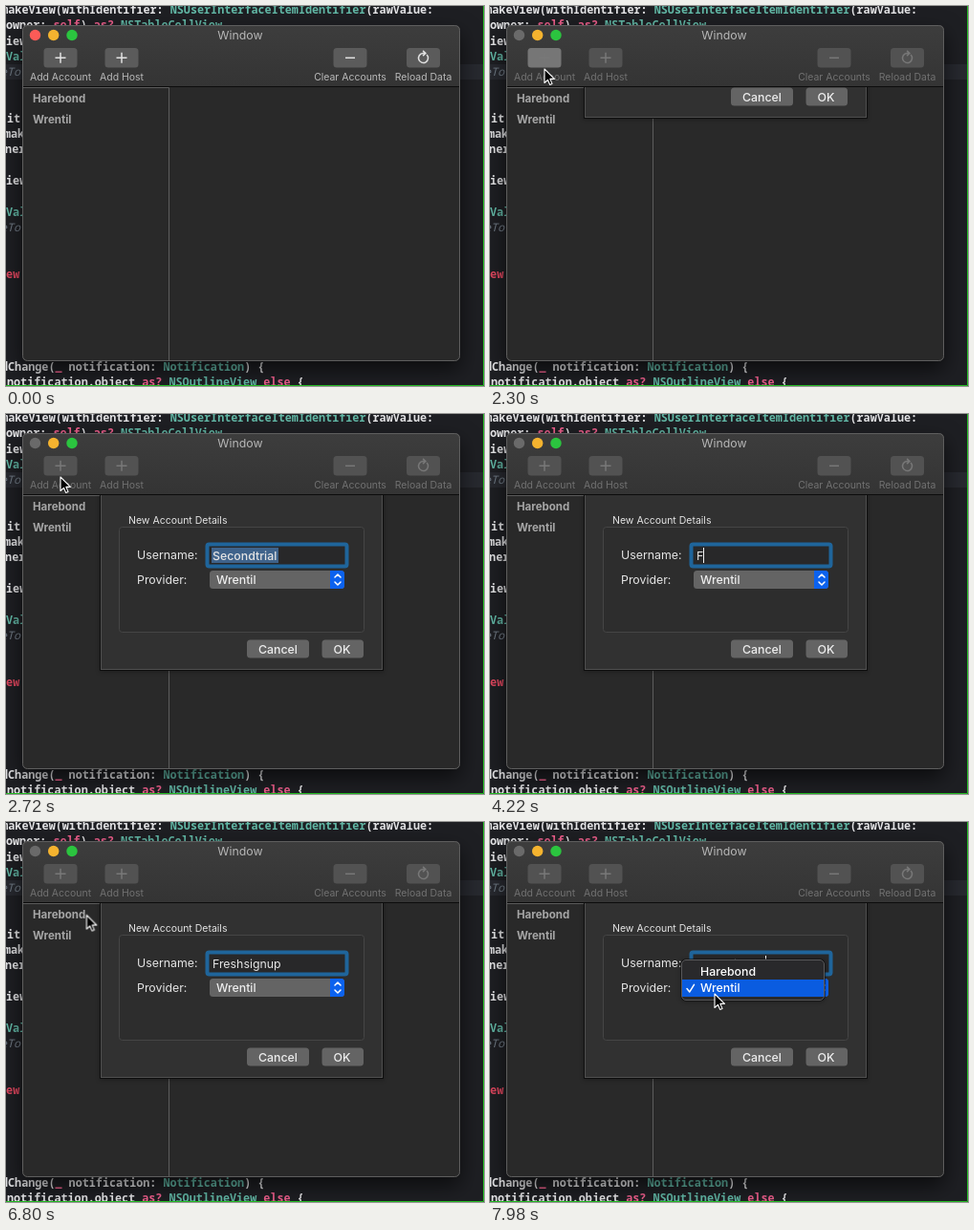
An HTML page that plays this animation: 500 px wide and 398 px high, repeating every 8000 ms.

```html
<!DOCTYPE html>
<html lang="en">
<head>
<meta charset="utf-8">
<title>Add account sheet</title>
<style>
html, body { margin: 0; width: 100%; height: 100%; overflow: hidden; background: #1c1d21; }
svg { display: block; width: 500px; height: 398px; }
text { font-family: Inter, "Open Sans", sans-serif; font-size: 12.35px; white-space: pre; }
.mid { text-anchor: middle; }

.code text { font: 600 11.78px "Noto Sans Mono", "DejaVu Sans Mono", monospace; fill: #e4e4e6; }
.code .type { fill: #62b8a6; }
.code .key { fill: #ee5f8c; }
.code .note { fill: #6f7984; font-style: italic; font-weight: 400; }
.code .err { fill: #e0475f; }
.shadow { filter: drop-shadow(0 9px 11px rgba(0, 0, 0, .6)); }
.soft { filter: drop-shadow(0 1px 2px rgba(0, 0, 0, .3)); }

.tool rect { fill: #5b5b5b; }
.tool path { fill: none; stroke: #e2e2e2; stroke-width: 1.5; }
.tool text { font-size: 10.46px; fill: #b9b9b9; text-anchor: middle; }
.side text { font-size: 11.5px; font-weight: 700; fill: #a6a6a6; }

.sheet text { fill: #e4e4e4; }
.sheet .title { font-size: 10.5px; }
.sheet .btn { fill: #646464; }
.sheet .face { font-weight: 500; fill: #ededed; }
.chev { fill: none; stroke: #fff; stroke-width: 1.5; stroke-linecap: round; stroke-linejoin: round; }
.menu text { fill: #fff; font-weight: 500; }

.sheet, .tool rect, .tool path, .tool text, .close, .cap, .ring, .pick, .menu, .mouse, .arrow {
  animation: 8s step-end infinite;
}
.close { animation-name: close; }
.tool rect { animation-name: dimBox; }
.tool rect:first-child { animation-name: pressBox; }
.tool path { animation-name: dimIcon; }
.tool text { animation-name: dimLabel; }
.sheet { animation-name: slide; }
.cap { animation-name: cap; }
.ring { animation-name: ring; animation-timing-function: linear; }
.pick { animation-name: pick; }
.menu { animation-name: menu; }
.mouse { animation-name: move; animation-timing-function: linear; }
.arrow { animation-name: arrow; }

@keyframes close { 0% { fill: #fc5b57; } 27.25%, 100% { fill: #6a6a6a; } }
@keyframes dimBox { 0% { fill: #5b5b5b; } 27.25%, 100% { fill: #525252; } }
@keyframes pressBox { 0% { fill: #5b5b5b; } 27.25% { fill: #767676; } 32.75%, 100% { fill: #525252; } }
@keyframes dimIcon { 0% { stroke: #e2e2e2; } 27.25%, 100% { stroke: #787878; } }
@keyframes dimLabel { 0% { fill: #b9b9b9; } 27.25%, 100% { fill: #717171; } }
@keyframes slide {
  0% { transform: translateY(-184px); visibility: hidden; }
  27.25% { transform: translateY(-184px); visibility: visible; animation-timing-function: cubic-bezier(.37, 0, .63, 1); }
  32.65%, 100% { transform: none; visibility: visible; }
}
@keyframes cap { 0% { opacity: 0; } 32.75%, 100% { opacity: 1; } }
@keyframes ring { 0%, 32.75% { opacity: 0; } 34%, 100% { opacity: 1; } }
@keyframes pick { 0% { opacity: 0; } 32.75% { opacity: 1; } 52.75%, 100% { opacity: 0; } }
@keyframes menu { 0% { opacity: 0; } 95.25%, 100% { opacity: 1; } }
@keyframes arrow { 0% { opacity: 0; } 9.75% { opacity: 1; } 52.75% { opacity: 0; } 85%, 100% { opacity: 1; } }
@keyframes move {
  0%, 9.75% { transform: translate(361px, 392px); animation-timing-function: cubic-bezier(.4, .2, .5, 1); }
  17.75% { transform: translate(56px, 75px); }
  18.75%, 20.25% { transform: translate(56px, 65px); }
  21.25%, 52.75% { transform: translate(57px, 66px); }
  52.76%, 85% { transform: translate(84px, 97px); }
  87% { transform: translate(143px, 181px); }
  88.5% { transform: translate(185px, 221px); }
  90.25% { transform: translate(202px, 202px); animation-timing-function: ease-out; }
  93.5%, 100% { transform: translate(235px, 180px); }
}
</style>
</head>
<body>
<svg viewBox="0 0 500 398">
  <defs>
    <linearGradient id="bar" x2="0" y2="1">
      <stop stop-color="#3d3d3d"/><stop offset="1" stop-color="#343434"/>
    </linearGradient>
    <clipPath id="below"><rect x="18" y="85" width="457" height="286"/></clipPath>
  </defs>

  <rect width="500" height="398" fill="#1e1f23"/>
  <rect y="61" width="500" height="16" fill="#27292f"/>
  <g class="code" id="code"></g>

  <rect class="shadow" x="17" y="20" width="458" height="352" rx="5" fill="#292929"/>
  <path d="M17 84V25a5 5 0 0 1 5-5H470a5 5 0 0 1 5 5V84Z" fill="url(#bar)"/>
  <path d="M17 84.5H475" stroke="#0c0c0c"/>
  <path d="M18 85.5H170.5V371" fill="none" stroke="#5c5c5c"/>
  <rect x="17.5" y="20.5" width="457" height="351" rx="5" fill="none" stroke="#5e5e5e"/>
  <circle class="close" cx="30.5" cy="30.5" r="5.7" fill="#fc5b57"/>
  <circle cx="49.7" cy="30.5" r="5.7" fill="#f5b32f"/>
  <circle cx="69" cy="30.5" r="5.7" fill="#2bc43f"/>
  <text class="mid" x="245" y="35" fill="#b6b6b6">Window</text>
  <g id="tools"></g>
  <g class="side">
    <text x="28" y="101">Harebond</text>
    <text x="28" y="122.5">Wrentil</text>
  </g>

  <g clip-path="url(#below)">
    <g class="sheet">
      <rect class="soft" x="98" y="70" width="297" height="199" fill="#0e0e0e"/>
      <rect x="99.5" y="70.5" width="294" height="197" fill="#313131" stroke="#505050"/>
      <text class="title" x="128" y="115">New Account Details</text>
      <rect x="118.5" y="118.5" width="256" height="110" rx="3" fill="#2d2d2d" stroke="#454545"/>
      <text x="137" y="152">Username:</text>
      <text x="137" y="178">Provider:</text>
      <rect x="211" y="137" width="145" height="22.5" fill="#282829"/>
      <path d="M211 159H356" stroke="#565656"/>
      <rect class="ring" x="210.5" y="136.5" width="146" height="23" rx="2" fill="none" stroke="#1f659b" stroke-width="4"/>
      <rect class="pick" x="215" y="140" width="70" height="16" fill="#3f638b"/>
      <text id="entry" x="216" y="153" style="font-weight:500"></text>
      <rect id="caret" y="140" width="1" height="16" fill="#f2f2f2"/>
      <rect class="btn" x="213" y="164" width="141" height="19" rx="3.5"/>
      <path class="cap" d="M339 164h11.5a3.5 3.5 0 0 1 3.5 3.5v12a3.5 3.5 0 0 1-3.5 3.5H339Z" fill="#0c62ee"/>
      <path class="chev" d="M344 171l3-3 3 3M344 176l3 3 3-3"/>
      <text class="face" x="220" y="178">Wrentil</text>
      <rect class="btn" x="252" y="236.5" width="65" height="19" rx="3.5"/>
      <rect class="btn" x="330.5" y="236.5" width="43.5" height="19" rx="3.5"/>
      <text class="face mid" x="284.5" y="250.5">Cancel</text>
      <text class="face mid" x="351.5" y="250.5">OK</text>
    </g>
  </g>

  <g class="menu">
    <rect class="soft" x="199.5" y="143.5" width="151" height="44" rx="5" fill="#0d0d0d"/>
    <rect x="200.5" y="144.5" width="149" height="42" rx="4.5" fill="#29292b" stroke="#59595b"/>
    <rect x="201" y="165" width="148" height="18" fill="#0a5ce0"/>
    <path class="chev" d="M206 174.5l2.8 3.4 4.7-7.6"/>
    <text x="220" y="161">Harebond</text>
    <text x="220" y="178">Wrentil</text>
  </g>

  <path d="M499.5 0V397.5H0" fill="none" stroke="#22b822"/>

  <g class="mouse">
    <path class="arrow" d="M0 0V14.5L3.4 11.3 5.6 16.4 8 15.4 5.8 10.4H10.4Z" fill="#000" stroke="#fff" stroke-width="1.1" stroke-linejoin="round"/>
  </g>
</svg>
<script>
const $ = id => document.getElementById(id);

// Editor text: line, x, then class|text pieces
const lines = [
  [0, -4.75, '|makeView(withIdentifier: ', 'type|NSUserInterfaceItemIdentifier', '|(rawValue:'],
  [1, 0, '|owner: ', 'key|self', '|) ', 'key|as?', '| ', 'type|NSTableCellView'],
  [2, -7, '|view'], [3, -7, 'type|nVal'], [4, -6, 'note|eTo'],
  [7, 1, '|it'], [8, -2, '|make'], [9, -15, '|owner'],
  [11, -7, '|view'], [13, -7, 'type|nVal'], [14, -6, 'note|eTo'],
  [17, -14, 'err|view'],
  [23, -5, '|dChange(', 'key|_', '| notification: ', 'type|Notification', '|) {'],
  [24, 1, '|notification.object ', 'key|as?', '| ', 'type|NSOutlineView', '| ', 'key|else', '| {']
];
$('code').innerHTML = lines.map(([row, x, ...parts]) =>
  `<text x="${x}" y="${8 + row * 16.27}">` + parts.map(p => {
    const [cls, str] = p.split('|');
    return `<tspan class="${cls}">${str}</tspan>`;
  }).join('') + '</text>').join('');

// Toolbar: the first button is the pressed one
const plus = 'M-5.5 0H5.5M0 -5.5V5.5', minus = 'M-5 0H5';
const reload = 'M3.6 -3.3A5 5 0 1 1 -.4 -4.8H2M-.4 -7.4L2.4 -4.8L-.4 -2.2';
const tools = [[57, 'Add Account', plus], [121, 'Add Host', plus],
  [360, 'Clear Accounts', minus], [436.5, 'Reload Data', reload]];
$('tools').innerHTML = '<g class="tool">' + tools.map(([x, label, icon]) =>
  `<rect x="${x - 17.5}" y="44" width="35" height="20.5" rx="3.5"/>
   <path d="${icon}" transform="translate(${x} 54.3)"/>
   <text x="${x}" y="77.5">${label}</text>`).join('') + '</g>';

// Typing
const oldName = 'Secondtrial', newName = 'Freshsignup';
const keys = [4220, 4460, 4640, 4780, 4980, 5220, 5380, 5520, 5760, 5980, 6120];
const entry = $('entry'), caret = $('caret');
let start, shown;

function draw(now) {
  start ??= now;
  const t = (now - start) % 8000;
  const n = keys.filter(k => t >= k).length;
  const str = n ? newName.slice(0, n) : oldName;
  if (str !== shown) {
    entry.textContent = shown = str;
    entry.style.fontWeight = n ? 400 : 500;
    caret.setAttribute('x', 216 + Math.round(entry.getComputedTextLength()));
  }
  caret.style.opacity = n && (t < 6800 || t >= 7620) ? 1 : 0;
  requestAnimationFrame(draw);
}
requestAnimationFrame(draw);
</script>
</body>
</html>
```
